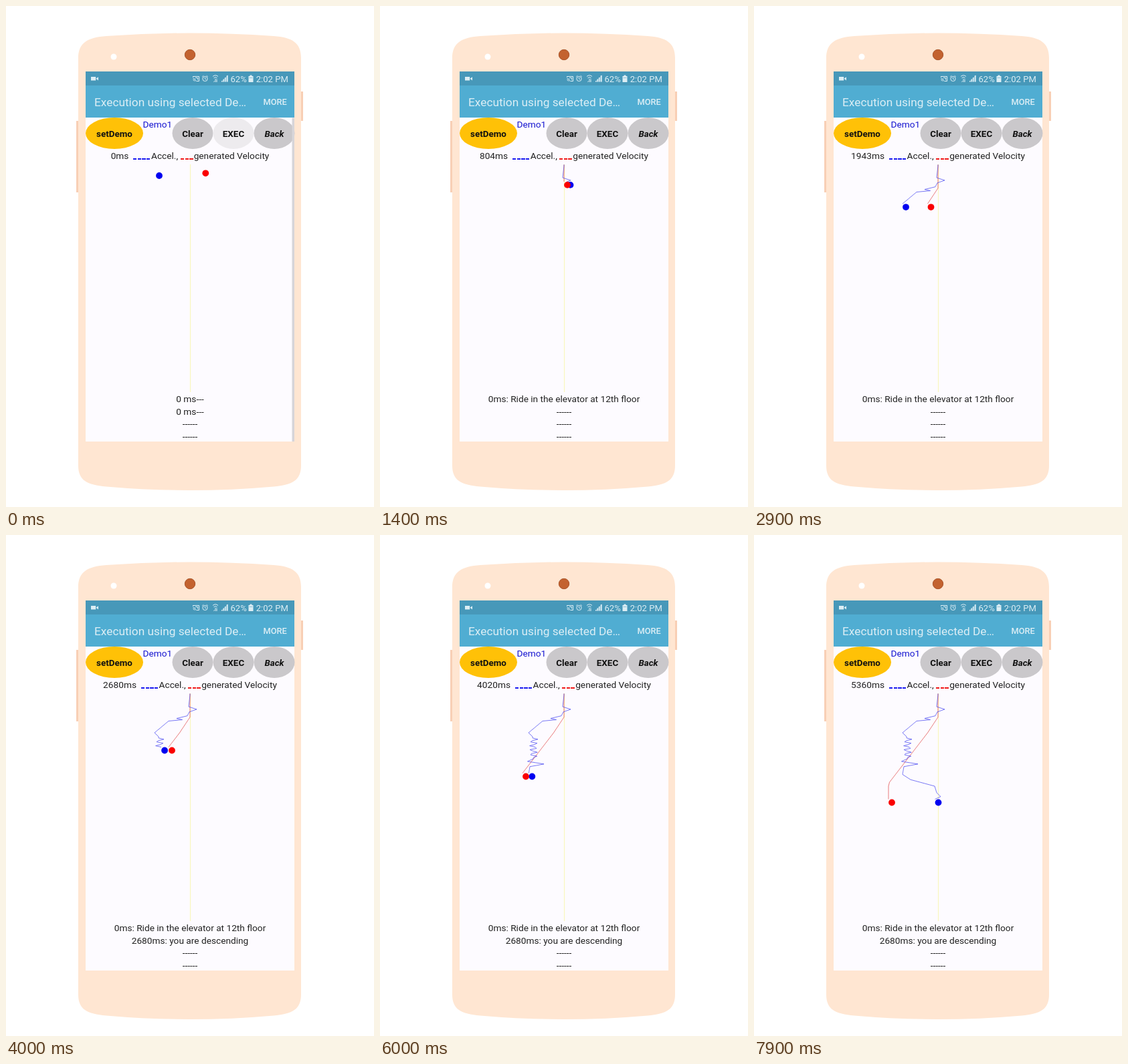
Write an HTML page that moves like this. It is 550 by 750 pixels and loops after 8000 ms.

```html
<!DOCTYPE html>
<html lang="en">
<head>
<meta charset="utf-8">
<title>Elevator demo</title>
<style>
html, body { margin: 0; width: 100%; height: 100%; overflow: hidden; background: #fff; }
#stage { position: absolute; left: 0; top: 0; width: 550px; height: 750px; font-family: Roboto, sans-serif; }
svg { position: absolute; left: 0; top: 0; }
svg text { font-size: 13.7px; fill: #222; }
svg .mid { text-anchor: middle; }
svg .button { font-size: 13.4px; font-weight: 700; fill: #111; text-anchor: middle; }
svg .bar { font-size: 13.1px; fill: #dceef5; }
svg .title { font-size: 17.3px; }
svg .menu { font-size: 12.8px; font-weight: 500; }
svg .demo { fill: #1818d0; }
#legend { position: absolute; left: 119px; top: 216px; width: 312px; text-align: center;
  font-size: 13.7px; line-height: 16px; white-space: pre; color: #222; }
.dash { display: inline-block; height: 2px; vertical-align: -1px;
  background: repeating-linear-gradient(90deg, currentColor 0 5.2px, transparent 5.2px 6.7px); }
.accel { width: 26.8px; color: #1818f0; }
.speed { width: 20.1px; color: #f01818; }
</style>
</head>
<body>
<div id="stage">
<svg width="550" height="750" viewBox="0 0 550 750">
  <path fill="#f8cfb5" d="M105 172h4v107h-4zM440 128h4v44h-4z"/>
  <path fill="#ffe6d2" d="M108 78C108 55 122 47 150 45Q275 36 400 45C428 47 441 55 441 78V688C441 710 428 717 400 719.500Q275 730.500 150 719.500C121 717 108 710 108 688Z"/>
  <circle cx="161" cy="76" r="4.500" fill="#fff"/>
  <circle cx="275" cy="73" r="7.700" fill="#c3622f" stroke="#a9542a"/>
  <path fill="#fdfbff" d="M119 98h312v554H119z"/>
  <path fill="#4798b9" d="M119 98h312v21H119z"/>
  <path fill="#50add2" d="M119 119h312v48H119z"/>

  <g fill="#dceef5">
    <path d="M127 106h7.200v5.600H127zM134.500 108.800l3.500-2.600v5.200z"/>
    <path d="M321.500 113.500L332 103V113.500z" opacity=".35"/>
    <path d="M322 113.500v-1.500h1.500v1.500zM324.500 113.500v-4h1.500v4zM327 113.500v-6.500h1.500v6.500zM329.800 113.500v-9.500h1.700v9.500z"/>
    <path d="M364.500 103.500h3v1.500h2v9h-7v-9h2z"/>
  </g>
  <g fill="none" stroke="#dceef5">
    <path d="M279.500 107v-1.500h9v7h-4M279.500 108.500a4 4 0 0 1 4 4M279.500 110.500a2 2 0 0 1 2 2M283 107.500h3.500v3"/>
    <circle cx="297.500" cy="109" r="3.600"/>
    <path d="M297.500 106.800v2.400l1.500 1M293.300 106l2-1.800M301.700 106l-2-1.800"/>
    <path d="M309 105.500q4-3.500 8 0M310.500 107.800q2.500-2.200 5 0M313 109v5M311.500 112.300l-1 1.500M315 109.500v4.500"/>
  </g>
  <path d="M363.500 107.500h5" stroke="#4798b9" opacity=".5"/>
  <text class="bar" x="335.500" y="113.800">62%</text>
  <text class="bar" x="373.700" y="113.800">2:02 PM</text>
  <text class="bar title" x="132" y="149.700">Execution using selected De…</text>
  <text class="bar menu" x="384.500" y="148">MORE</text>

  <ellipse cx="162" cy="190.500" rx="43" ry="23.500" fill="#ffc107"/>
  <g fill="#cac8cb">
    <ellipse cx="279" cy="190.500" rx="30.500" ry="23.500"/>
    <ellipse id="exec" cx="340" cy="190.500" rx="30.500" ry="23.500"/>
    <ellipse cx="401" cy="190.500" rx="30.500" ry="23.500"/>
  </g>
  <text class="button" x="162" y="195.500">setDemo</text>
  <text class="button" x="279" y="195.500">Clear</text>
  <text class="button" x="340" y="195.500">EXEC</text>
  <text class="button" x="401" y="195.500" font-style="italic">Back</text>
  <text class="demo" x="204.500" y="182.300">Demo1</text>

  <path d="M275.500 237V578" stroke="#f9f7bd" stroke-width="1.200"/>
  <g fill="none" stroke-width=".7" stroke-linejoin="round">
    <polyline id="speedLine" stroke="#e04040"/>
    <polyline id="accelLine" stroke="#4040f0"/>
  </g>
  <circle id="accelDot" r="4.900" fill="#0000f0"/>
  <circle id="speedDot" r="4.900" fill="#fa0000"/>

  <g id="log">
    <text class="mid" x="275" y="593"></text>
    <text class="mid" x="275" y="611.500"></text>
    <text class="mid" x="275" y="630"></text>
    <text class="mid" x="275" y="648.500"></text>
  </g>
  <path id="scroll" d="M427.500 167.500H431V652h-3.500z" fill="#d7d5d9"/>
</svg>
<div id="legend"><span id="clock"></span>  <i class="dash accel"></i>Accel., <i class="dash speed"></i>generated Velocity</div>
</div>
<script>
const LOOP = 8000, STEP = 100, TICK = 67, START = 300;
const $ = id => document.getElementById(id);

// Playback pace: [loop time, sample]
const pace = [[START, 0], [2900, 29], [3700, 38], [4000, 40], [5200, 51], [7900, 80]];

// Turning points of both curves: [sample, x]
const speedKeys = [[0, 275], [17, 275], [29, 259.5], [67, 202.5], [70, 201]];
const accelKeys = [[0, 275], [9, 273], [11, 285], [13, 274], [16, 271], [18, 255], [19, 263.5],
  [20, 243], [29, 222], [33, 230], [49, 229], [51, 220.5], [53, 245], [55, 224], [61, 222],
  [65, 234], [70, 270], [75, 273], [78, 279], [80, 270.5]];

function lerp(table, at) {
  const i = table.findIndex(([key]) => key >= at);
  if (i < 0) return table[table.length - 1][1];
  if (i === 0) return table[0][1];
  const [a, from] = table[i - 1], [b, to] = table[i];
  return from + (to - from) * (at - a) / (b - a);
}

// The cabin shakes evenly while it speeds up
const shake = n => n > 32 && n < 49 ? 6 * Math.cos(2 * Math.PI * (n - 34) / 3.3) : 0;
const accelX = n => lerp(accelKeys, n) + shake(n);
const speedX = n => lerp(speedKeys, n);
const rowY = n => 239.5 + 1.95 * n;

function place(dot, x, y) {
  dot.setAttribute("cx", x);
  dot.setAttribute("cy", y);
}

function trace(name, xAt, count) {
  let points = "";
  for (let n = -1; n <= count; n++) points += `${xAt(n)},${rowY(n)} `;
  $(name + "Line").setAttribute("points", points);
  place($(name + "Dot"), xAt(count) + 5, rowY(count) + 5);
}

function log(...lines) {
  [...$("log").children].forEach((row, i) => row.textContent = lines[i] || "------");
}

function drawIdle() {
  $("clock").textContent = "0ms";
  log("0 ms---", "0 ms---");
  for (const name of ["accel", "speed"]) $(name + "Line").setAttribute("points", "");
  place($("accelDot"), 229, 254);
  place($("speedDot"), 298.3, 250.3);
}

function drawRun(time) {
  const count = Math.round(lerp(pace, time));
  $("clock").textContent = count * TICK + "ms";
  log("0ms: Ride in the elevator at 12th floor", count >= 40 && "2680ms: you are descending");
  trace("accel", accelX, count);
  trace("speed", speedX, count);
}

function draw(time) {
  $("exec").setAttribute("fill", time < STEP ? "#edebee" : "#cac8cb");
  $("scroll").setAttribute("opacity", Math.max(0, Math.min(1, (600 - time) / 300)));
  if (time < START) drawIdle();
  else drawRun(time);
}

const begin = performance.now();
function frame() {
  const elapsed = (performance.now() - begin) % LOOP;
  draw(Math.floor(elapsed / STEP) * STEP);
  requestAnimationFrame(frame);
}
frame();
</script>
</body>
</html>
```
